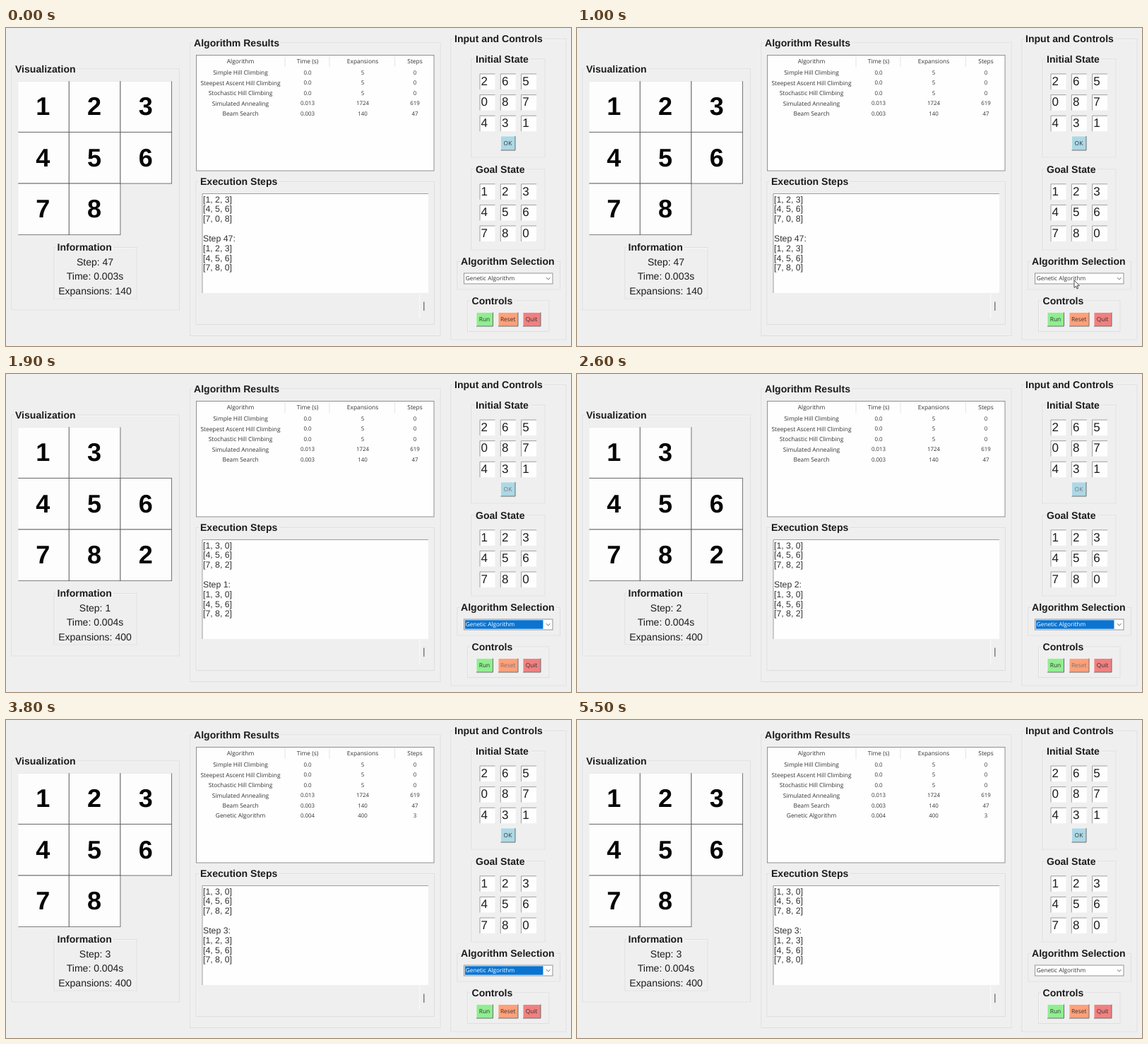
Animation of 800 by 450 pixels, one loop 5600 ms. Source, as an HTML page:

```html
<!DOCTYPE html>
<html lang="en">
<head>
<meta charset="utf-8">
<title>8-Puzzle Solver</title>
<style>
html, body { margin: 0; width: 100%; height: 100%; overflow: hidden; background: #efefef; }
svg { display: block; width: 100vw; height: 100vh; }
text {
  font-family: "Liberation Sans", Arial, sans-serif;
  fill: #1c1c1c;
  white-space: pre;
  text-rendering: geometricPrecision;
}
.ui { font-family: "Open Sans", "Noto Sans", sans-serif; fill: #333; }
.log { fill: #333; }
.title { font-weight: bold; paint-order: stroke; stroke: #efefef; stroke-width: 6px; }
.tile { font-weight: bold; fill: #050505; }
</style>
</head>
<body>
<svg id="stage" viewBox="0 0 800 450">
  <clipPath id="boardClip"><rect x="17.3" y="75.3" width="218.4" height="218.2"/></clipPath>
</svg>
<script>
const LOOP = 5600;
const NS = "http://www.w3.org/2000/svg";
const stage = document.getElementById("stage");

function el(tag, attrs, parent = stage) {
  const node = document.createElementNS(NS, tag);
  for (const key in attrs) node.setAttribute(key, attrs[key]);
  return parent.appendChild(node);
}

const rect = (x, y, width, height, fill, more = {}, parent = stage) =>
  el("rect", { x, y, width, height, fill, ...more }, parent);

const line = (d, stroke, width = 1, parent = stage) =>
  el("path", { d, stroke, fill: "none", "stroke-width": width }, parent);

// Places text by the vertical middle of its capitals.
function label(str, x, mid, size, more = {}, parent = stage) {
  const node = el("text", { x, y: mid + size * 0.345, "font-size": size, ...more }, parent);
  node.textContent = str;
  return node;
}

const middle = { "text-anchor": "middle" };
const ui = { class: "ui" };
const uiMiddle = { ...middle, ...ui };

function group(title, x1, y1, x2, y2, tx) {
  rect(x1 + 1, y1 + 1, x2 - x1 - 1, y2 - y1 - 1, "none", { stroke: "#f8f8f8", "stroke-width": 0.8 });
  rect(x1, y1, x2 - x1, y2 - y1, "none", { stroke: "#dcdcdc", "stroke-width": 0.9 });
  label(title, tx, y1, 14.05, { class: "title" });
}

function sunken(x, y, w, h) {
  rect(x, y, w, h, "#fefefe");
  line(`M${x} ${y + h}V${y}H${x + w}`, "#8f8f8f", 0.85);
}

function button(str, x, y, w, h, fill) {
  rect(x, y, w, h, fill);
  line(`M${x} ${y + h}V${y}H${x + w}`, "#f4f4f4", 0.8);
  line(`M${x} ${y + h}H${x + w}V${y}`, "#6c6f6f", 1);
  return label(str, x + w / 2 - 0.3, y + h / 2 - 0.2, 8.4, uiMiddle);
}

function entries(digits, top) {
  [...digits].forEach((d, i) => {
    const x = 671 + (i % 3) * 29.3, y = top + Math.floor(i / 3) * 29.6;
    sunken(x, y, 21.5, 22);
    label(d, x + 1.6, y + 10, 17);
  });
}

// Left panel
group("Visualization", 8, 58, 245.5, 399, 13);
const board = el("g", { "clip-path": "url(#boardClip)" });
const CELL = 72.67;
const tiles = Array.from({ length: 9 }, (_, i) => {
  const x = 16.6 + (i % 3) * CELL, y = 74.7 + Math.floor(i / 3) * CELL;
  const g = el("g", {}, board);
  rect(x, y, CELL, CELL, "#fdfdfd", { stroke: "#5c5c5c", "stroke-width": 0.85 }, g);
  const num = label("", x + CELL / 2 - 0.6, y + CELL / 2 - 0.5, 36, { class: "tile", ...middle }, g);
  return { g, num };
});
group("Information", 68, 310.5, 185, 383, 72.5);
const info = [331, 351.5, 372].map(y => label("", 126, y, 14, middle));

// Results table
group("Algorithm Results", 261, 21, 615, 435.5, 266);
rect(269.5, 38.5, 336.5, 163.5, "#fefefe", { stroke: "#858585", "stroke-width": 0.9 });
[395, 458, 550.5].forEach(x => line(`M${x} 39.5V55`, "#e2e2e2", 0.9));
const columns = [332, 427, 505, 579];

function row(cells, y, parent = stage) {
  cells.forEach((c, i) => label(c, columns[i], y, /^\d/.test(c) ? 7.9 : 8.4, uiMiddle, parent));
}

row(["Algorithm", "Time (s)", "Expansions", "Steps"], 47.3);
[
  ["Simple Hill Climbing", "0.0", "5", "0"],
  ["Steepest Ascent Hill Climbing", "0.0", "5", "0"],
  ["Stochastic Hill Climbing", "0.0", "5", "0"],
  ["Simulated Annealing", "0.013", "1724", "619"],
  ["Beam Search", "0.003", "140", "47"]
].forEach((cells, i) => row(cells, 63.3 + i * 14.45));
const newRow = el("g", {});
row(["Genetic Algorithm", "0.004", "400", "3"], 135.6, newRow);

// Execution log
group("Execution Steps", 269, 217.5, 606.5, 419.5, 275);
sunken(278, 234.5, 320, 140.5);
const log = Array.from({ length: 8 }, (_, i) =>
  label("", 279, 242.3 + i * 13.85, 12.3, { class: "log" }));
line("M585.8 376V411", "#fafafa", 1.2);
const thumb = line("M591.8 387.5V400", "#555", 1.1);
const arrows = el("path", { d: "M588.7 384l3.1-4.7 3.1 4.7zM588.7 404.3l3.1 4.7 3.1-4.7z", fill: "#9a9a9a" });

// Right panel
group("Input and Controls", 630, 15.5, 793, 441, 635);
group("Initial State", 659, 44, 763, 183, 665);
entries("265087431", 65);
const okText = button("OK", 700.5, 153, 20.5, 20, "#add8e6");
group("Goal State", 659, 200, 763, 314, 665);
entries("123456780", 220.8);
group("Algorithm Selection", 639, 330.5, 784.5, 370, 644);
rect(648.5, 347, 125.5, 15, "#fefefe", { stroke: "#8a8a8a", "stroke-width": 0.9 });
const highlight = rect(649.8, 348.3, 110.7, 12.4, "#0a74d1");
const choice = label("Genetic Algorithm", 650.8, 354.5, 8.25, ui);
line("M765 353.2l2.8 2.7 2.8-2.7", "#555", 0.9);
group("Controls", 653.5, 386, 769, 429.5, 659.5);
button("Run", 666, 402.5, 23.5, 19.5, "#90ee90");
const resetText = button("Reset", 697, 402.5, 28, 19.5, "#ffa07a");
button("Quit", 732, 402.5, 25, 19.5, "#f08080");
const pointer = el("path", {
  d: "M0 0V10.6L2.4 8.3 4 12 5.6 11.3 4 7.7H7.4Z", fill: "#fff", stroke: "#222", "stroke-width": 0.8
});

// Timeline
const SOLVED = "123456780", ALMOST = "130456782";
const scenes = [
  { at: 0, step: 47, time: "0.003", count: 140, state: SOLVED, prev: "123456708" },
  { at: 1300, step: 0, time: "0.004", count: 400, state: ALMOST },
  { at: 1900, step: 1, time: "0.004", count: 400, state: ALMOST, prev: ALMOST },
  { at: 2500, step: 2, time: "0.004", count: 400, state: ALMOST, prev: ALMOST },
  { at: 3100, step: 3, time: "0.004", count: 400, state: SOLVED, prev: ALMOST }
];
const pointerPath = [[1000, 704, 357], [1200, 671.7, 414.3], [1500, 671.7, 414.3], [1750, 668, 452]];

const rows = state => state.match(/.../g).map(r => `[${[...r].join(", ")}]`);
const show = (node, on) => node.setAttribute("visibility", on ? "visible" : "hidden");

function setScene(s) {
  tiles.forEach(({ g, num }, i) => {
    show(g, s.state[i] !== "0");
    num.textContent = s.state[i];
  });
  info[0].textContent = `Step: ${s.step}`;
  info[1].textContent = `Time: ${s.time}s`;
  info[2].textContent = `Expansions: ${s.count}`;
  const before = s.prev ? [...rows(s.prev), ""] : [];
  const lines = [...before, `Step ${s.step}:`, ...rows(s.state)];
  log.forEach((node, i) => { node.textContent = lines[i] || ""; });
  show(thumb, s.prev);
  show(arrows, !s.prev);
}

function movePointer(t) {
  const i = pointerPath.findIndex(([at]) => at > t);
  show(pointer, i > 0);
  if (i < 1) return;
  const [t0, x0, y0] = pointerPath[i - 1], [t1, x1, y1] = pointerPath[i];
  const k = (t - t0) / (t1 - t0), e = k * k * (3 - 2 * k);
  pointer.setAttribute("transform", `translate(${x0 + (x1 - x0) * e} ${y0 + (y1 - y0) * e})`);
}

let current;
function render(now) {
  const t = now % LOOP;
  const scene = scenes.filter(s => s.at <= t).pop();
  if (scene !== current) setScene(current = scene);
  const running = t >= 1300 && t < 3100;
  for (const node of [okText, resetText]) node.style.fill = running ? "#747474" : "";
  const selected = t >= 1200 && t < 5200;
  show(highlight, selected);
  choice.style.fill = selected ? "#fff" : "";
  show(newRow, t >= 3100);
  movePointer(t);
}

const start = performance.now();
function tick() {
  render(performance.now() - start);
  requestAnimationFrame(tick);
}
tick();
</script>
</body>
</html>
```
